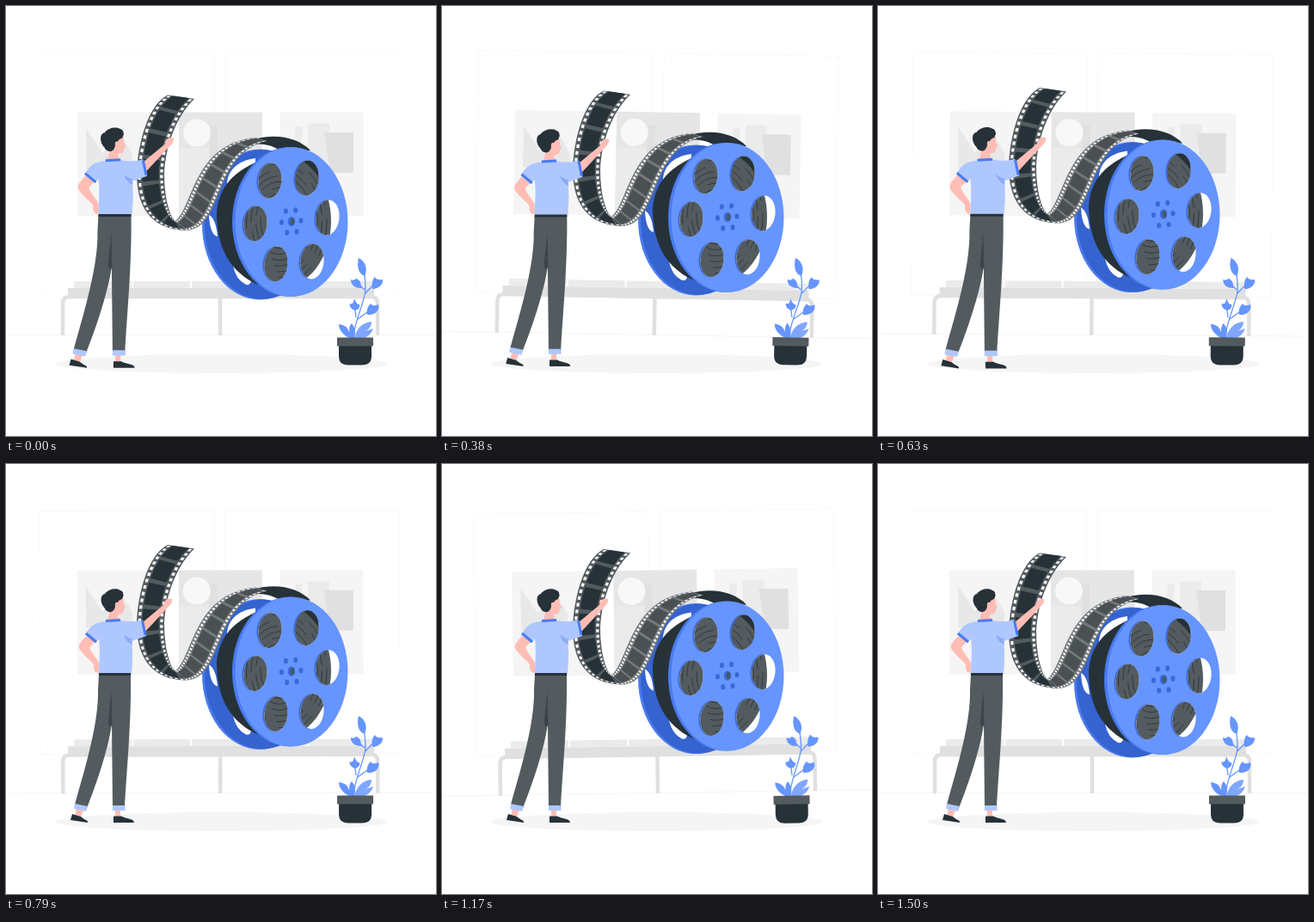
Animation of 500 by 500 pixels, one loop 1540 ms. Source, as an HTML page:

```html
<!DOCTYPE html>
<html lang="en">
<head>
<meta charset="utf-8">
<title>Film reel</title>
<style>
  html, body { margin: 0; width: 100%; height: 100%; overflow: hidden; background: #fff; }
  svg { display: block; width: 100%; height: 100%; }
</style>
</head>
<body>
<svg viewBox="0 0 500 500">
  <defs>
    <clipPath id="windows"></clipPath>
  </defs>

  <g id="room">
    <g fill="none" stroke="#f9f9f9">
      <rect x="39.500" y="55" width="203" height="282"/>
      <rect x="255" y="55" width="203" height="282"/>
      <path d="M-20 382.500H520" stroke="#f5f5f5"/>
    </g>
    <path d="M83 123.500h97v121H83zM318.500 123.500h97v121h-97z" fill="#f5f5f5"/>
    <path d="M93 190V142L113 172 129 142 147 172V190z" fill="#e8e8e8"/>
    <path d="M201 123.500h97v121h-97z" fill="#e6e6e6"/>
    <path d="M201 165h35v80h-35z" fill="#ebebeb"/>
    <path d="M237 139h9v106h-9z" fill="#e0e0e0"/>
    <circle cx="222" cy="147.500" r="16" fill="#f8f8f8"/>
    <path d="M337 140h8l-5 54h-9zM351 136.500h25v57h-25z" fill="#ebebeb"/>
    <path d="M370 147h34v47h-27z" fill="#e0e0e0"/>
    <path d="M79 328v-6q0-2 3-2h64v8zM148 328v-8h66v8zM216 328v-8h66v8zM284 328v-8h66v8zM352 328v-8h72q3 0 3 2v6z" fill="#ebebeb"/>
    <path d="M72 328H428V340H72z" fill="#e0e0e0"/>
    <path d="M66 383V346q0-8 8-8H424q8 0 8 8V383M249 338V383" fill="none" stroke="#e0e0e0" stroke-width="4.500"/>
  </g>

  <ellipse cx="250" cy="416" rx="193" ry="11" fill="#f5f5f5"/>

  <g id="reel">
    <ellipse cx="295" cy="254" rx="67" ry="87.500" fill="#4a7bf0"/>
    <ellipse cx="298" cy="254" rx="67" ry="87" fill="#3563d0"/>
    <path d="M257 209C257 192 268 180 290 177L290 186zM236 243Q244 247 246 268Q237 266 236 243zM264 302Q276 308 285 320Q284 325 279 324Q267 318 264 302z" fill="#fff"/>
    <path d="M286 156C312 147 340 153 354 168L322 170C312 163 300 159 288 161z" fill="#263238"/>
    <path d="M290 182L330 330C300 330 286 323 270 309C252 292 245 268 245 240C247 214 261 195 290 182z" fill="#263238"/>
    <g id="film"></g>
    <ellipse cx="329.500" cy="251" rx="66.500" ry="87" fill="#4a7bf0"/>
    <ellipse cx="332" cy="251" rx="65.500" ry="87" fill="#6695ff"/>
    <g id="rims" fill="#3a68d8"></g>
    <g clip-path="url(#windows)">
      <path d="M260 160H400V340H260z" fill="#fff"/>
      <path d="M335 170H372V215H335z" fill="#263238"/>
      <ellipse cx="318" cy="250" rx="60" ry="78" fill="#535b5f"/>
      <g id="grooves" fill="none" stroke="#263238" stroke-width=".8"></g>
    </g>
    <g id="hub" fill="#3a68d8">
      <ellipse cx="332" cy="250.500" rx="4.200" ry="5.600"/>
      <ellipse cx="333" cy="250.500" rx="2.300" ry="4" fill="#455a64"/>
    </g>
  </g>

  <g id="plant" fill="#6695ff">
    <path d="M404 386C405 366 417 345 418 330Q418 316 415 304M418 334L431 320M417 330L406 320M409 364L427 351M407 362L405 346" fill="none" stroke="#6695ff" stroke-width="1.300"/>
    <path d="M417 314C409 311 408 302 410 293C415 295 422 303 417 314z"/>
    <path d="M413 328C404 328 401 323 401 318Q405 320 407 317C412 318 413 323 413 328z"/>
    <path d="M426 329C425 322 426 318 429 315Q431 319 438 318C439 323 434 329 426 329z"/>
    <path d="M406 354C400 352 399 348 400 346Q404 348 405 340Q408 348 411 347C412 350 410 353 406 354z"/>
    <path d="M420 359C419 353 421 349 424 346Q426 350 433 347C435 353 430 360 420 359z"/>
    <path d="M399 386C391 382 387 376 387 370Q397 371 399 379Q399 371 402 369Q408 376 405 386z"/>
    <path d="M405 386C407 377 413 368 425 367C425 373 422 376 418 378L427 375Q424 384 416 386z" fill="#80a7ff"/>
    <path d="M387 394H425V407Q425 417.500 414 417.500H398Q387 417.500 387 407z" fill="#263238"/>
    <path d="M385 385.500H427V395.500H385z" fill="#535b5f"/>
  </g>

  <g id="man">
    <g fill="#ffbdb5">
      <path d="M93 200C88 206 82 211 86 216C92 224 98 228 102 233C101 240 104 243 108 243V231C104 224 99 219 97 213L104 206z"/>
      <path d="M159 184L183 164C184 159 187 155 193 157C194 161 190 165 187 168L161 196z"/>
      <path d="M82 400L90 402 87 411 80 409zM127 401H133V411H127z"/>
      <path d="M122 155H136L137 163 139 167 137 169Q137 175 130 175L131 182Q124 186 118 182L121 170z"/>
    </g>
    <path d="M115 168C109 162 109 152 115 151C119 145 129 144 133 147C137 148 137 153 135 157Q131 158 130 161Q126 160 127 166Q125 173 120 172Q116 171 115 168z" fill="#263238"/>
    <path d="M131 148Q136 147 136 154" fill="none" stroke="#263238"/>
    <path d="M116 183C104 184 99 187 92 198L104 208 108 203C110 220 108 230 108 244H146C147 230 148 220 146 206L163 200 158 181C150 184 140 183 133 182z" fill="#aec7ff"/>
    <path d="M137 198Q142 203 146 203L147 210Q139 207 137 198z" fill="#8aabf5"/>
    <path d="M116 182.500L133 181.500M93 197L105 207M158.500 182L162 199" fill="none" stroke="#4a7bf0" stroke-width="3"/>
    <path d="M108 244H145C146 300 140 360 138 399H124L123 303C118 335 104 375 94 400L80 396C93 350 108 300 107 262z" fill="#535b5f"/>
    <path d="M122.500 264L123.500 303Q119 310 119 298z" fill="#3b454a"/>
    <path d="M108 243H145V246H108z" fill="#263238"/>
    <path d="M80 395L95 398 93 404 79 401zM124 397H138.500V403H124z" fill="#aec7ff"/>
    <path d="M77 407L87 410C91 414 96 414 95 417L75 414zM125 409.500L134 409.500C140 413 149 412 149 417H125z" fill="#263238"/>
  </g>
</svg>
<script>
const $ = id => document.getElementById(id);

function add(parent, tag, attrs) {
  const node = document.createElementNS('http://www.w3.org/2000/svg', tag);
  for (const name in attrs) node.setAttribute(name, attrs[name]);
  return parent.appendChild(node);
}

// Point on a chain of cubic curves, u from 0 to 1
function along(pts, u) {
  const count = (pts.length - 1) / 3;
  const i = Math.min(count - 1, Math.floor(u * count));
  const s = u * count - i, r = 1 - s;
  const [a, b, c, d] = pts.slice(i * 3, i * 3 + 4);
  return [0, 1].map(k => r * r * r * a[k] + 3 * r * r * s * b[k] + 3 * r * s * s * c[k] + s * s * s * d[k]);
}

const clamp = u => Math.max(0, Math.min(1, u));

function strip(left, right, cells, shift, base, dark) {
  const at = (u, v) => {
    const a = along(left, u), b = along(right, u);
    return [a[0] + (b[0] - a[0]) * v, a[1] + (b[1] - a[1]) * v].map(n => n.toFixed(1)).join(' ');
  };
  const patch = (u0, u1, v0, v1, steps) => {
    const near = [], far = [];
    for (let i = 0; i <= steps; i++) {
      const u = clamp(u0 + (u1 - u0) * i / steps);
      near.push(at(u, v0));
      far.unshift(at(u, v1));
    }
    return 'M' + near.concat(far).join('L') + 'z';
  };
  const row = (n, offset, gap, v0, v1, steps) => {
    let d = '';
    for (let i = 0; i <= n; i++) {
      d += patch((i - offset + gap) / n, (i - offset + 1 - gap) / n, v0, v1, steps);
    }
    return d;
  };
  const holes = (v0, v1) => row(cells * 4, 0, .24, v0, v1, 1);
  const film = $('film');
  add(film, 'path', { d: patch(0, 1, 0, 1, 40), fill: base });
  add(film, 'path', { d: row(cells, shift, .08, .2, .8, 5), fill: dark });
  add(film, 'path', { d: holes(.05, .15) + holes(.85, .95), fill: '#fff' });
}

strip([[197, 250], [218, 232], [218, 160], [290, 153]],
      [[209, 261], [254, 260], [240, 170], [304, 157]], 8, 0, '#74797b', '#4a5053');
strip([[188, 103.5], [165, 115], [153, 160], [152, 195], [152, 240], [174, 260], [209, 261]],
      [[219, 108], [197, 129], [185, 165], [184, 195], [184, 225], [191, 246], [197, 250]], 7, .15, '#535b5f', '#263238');

const holes = [[307, 203], [350, 200], [290, 253], [374, 246], [314, 300], [356, 297]];
for (const [cx, cy] of holes) {
  const size = { cy, rx: 13.5, ry: 20.5, transform: `rotate(6 ${cx} ${cy})` };
  add($('rims'), 'ellipse', { ...size, cx: cx - 1.5, rx: 14 });
  add($('windows'), 'ellipse', { ...size, cx });
}
for (let i = 0; i < 7; i++) {
  add($('grooves'), 'ellipse', {
    cx: 318, cy: 250, rx: 22 + i * 5.5, ry: 32 + i * 6.8, 'stroke-dasharray': `${24 + i * 3} ${9 + i}`
  });
}
for (let i = 0; i < 6; i++) {
  const a = (i * 60 - 4) * Math.PI / 180;
  add($('hub'), 'ellipse', { cx: 331.7 + 11.3 * Math.cos(a), cy: 250.5 + 14.5 * Math.sin(a), rx: 2.5, ry: 3.2 });
}

// Same curve as the CSS "ease" keyword
function ease(x) {
  let lo = 0, hi = 1, s = .5;
  for (let i = 0; i < 16; i++) {
    s = (lo + hi) / 2;
    if (.75 * s * (1 - s) + s ** 3 < x) lo = s; else hi = s;
  }
  return .3 * s * (1 - s) ** 2 + 3 * s * s * (1 - s) + s ** 3;
}

const LOOP = 1540;
const beats = [[-40, 0], [165, 1], [355, 0], [545, 1], [760, 0], [1500, 0], [1705, 1]];

function beat(t) {
  const i = beats.findIndex(key => key[0] > t);
  const [t0, v0] = beats[i - 1], [t1, v1] = beats[i];
  return v0 + (v1 - v0) * ease((t - t0) / (t1 - t0));
}

function draw(now) {
  const t = now % LOOP, k = Math.min(t / 1500, 1);
  const tilt = k < .25 ? 4 * k : k < .75 ? 2 - 4 * k : 4 * k - 4;
  const lift = 10 * (1 - Math.abs(1 - 2 * k));
  const scale = 1 + .1 * beat(t);
  $('room').setAttribute('transform', `rotate(${tilt} 250 250)`);
  $('plant').setAttribute('transform', `rotate(${tilt} 412 355)`);
  $('reel').setAttribute('transform', `translate(0 ${-lift})`);
  $('man').setAttribute('transform', `translate(127 281) scale(${scale}) translate(-127 -281)`);
}

let start;
function tick(now) {
  start ??= now;
  draw(now - start);
  requestAnimationFrame(tick);
}
draw(0);
requestAnimationFrame(tick);
</script>
</body>
</html>
```
